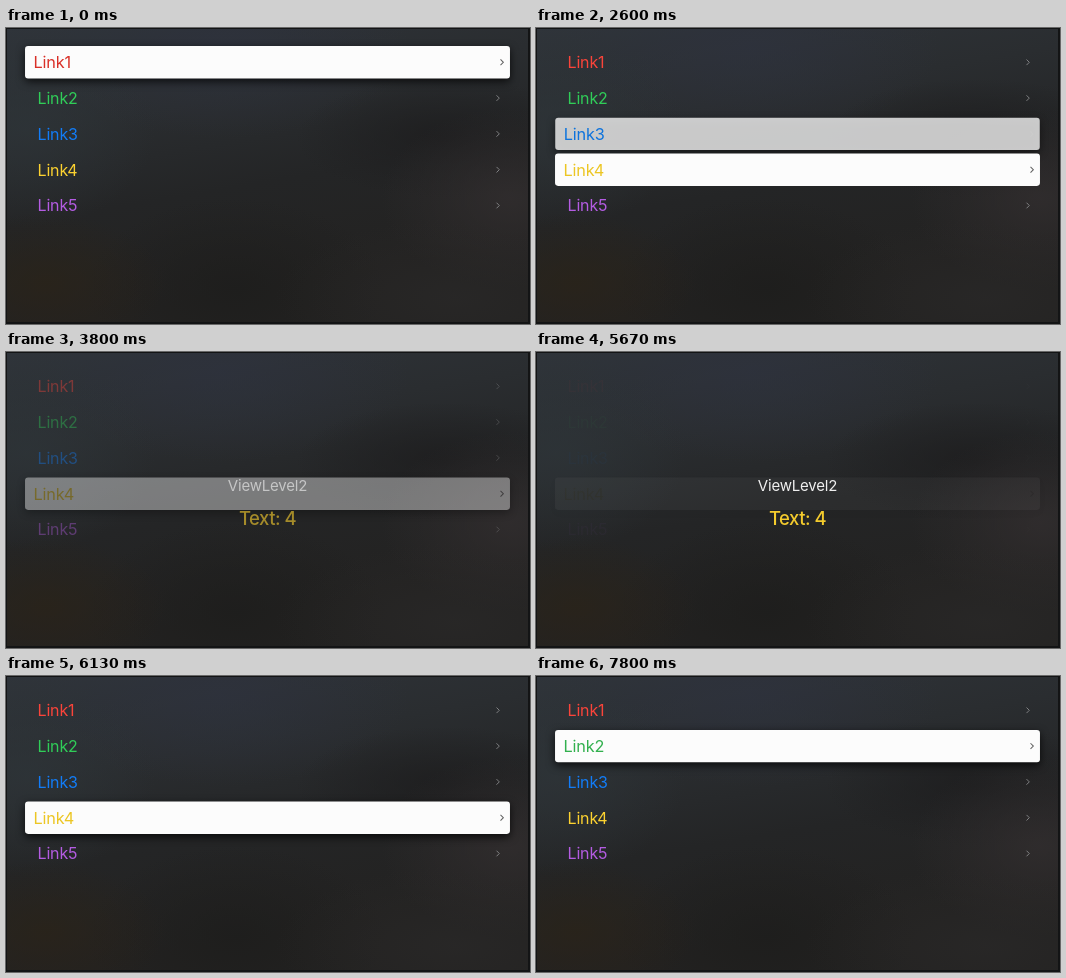
Write an HTML page with a canvas that moves like this. It is 524 by 296 pixels and loops after 8 s.

```html
<!DOCTYPE html>
<html lang="en">
<head>
<meta charset="utf-8">
<title>Link list</title>
<style>
  html, body { margin: 0; width: 100%; height: 100%; overflow: hidden; background: #262728; }
  canvas { display: block; }
</style>
</head>
<body>
<canvas id="stage" width="524" height="296"></canvas>
<script>
const W = 524, H = 296, LOOP = 8000;
const GROW = 1.0175, FADE = 200;
const MID = 261.5;
const FONT = 'Inter, Roboto, sans-serif';

const links = [
  { rest: [250, 68, 58], lit: [217, 48, 40] },
  { rest: [48, 205, 88], lit: [50, 176, 78] },
  { rest: [18, 124, 246], lit: [12, 112, 214] },
  { rest: [252, 210, 48], lit: [236, 198, 36] },
  { rest: [180, 92, 226], lit: [160, 76, 205] },
];

// Focus moves: time and row
const moves = [[0, 0], [1200, 1], [1930, 2], [2600, 3], [7000, 2], [7600, 1]];

const stage = document.getElementById('stage').getContext('2d');
const backdrop = makeLayer();
const list = makeLayer();

function makeLayer() {
  const c = document.createElement('canvas');
  c.width = W;
  c.height = H;
  return c.getContext('2d');
}

const clamp = v => Math.min(1, Math.max(0, v));
const ramp = (t, from, to) => clamp((t - from) / (to - from));
const mix = (a, b, k) => a + (b - a) * k;
const rgb = (a, b, k) => `rgb(${a.map((v, i) => Math.round(mix(v, b[i], k)))})`;

function glow(g, x, y, rx, ry, color, alpha) {
  g.save();
  g.translate(x, y);
  g.scale(rx, ry);
  const fill = g.createRadialGradient(0, 0, 0, 0, 0, 1);
  fill.addColorStop(0, `rgba(${color},${alpha})`);
  fill.addColorStop(0.5, `rgba(${color},${alpha * 0.5})`);
  fill.addColorStop(1, `rgba(${color},0)`);
  g.fillStyle = fill;
  g.fillRect(-1, -1, 2, 2);
  g.restore();
}

function paintBackdrop(g) {
  const base = g.createLinearGradient(0, 0, 50, H);
  base.addColorStop(0, '#2f343a');
  base.addColorStop(0.35, '#2a2d30');
  base.addColorStop(0.65, '#242526');
  base.addColorStop(1, '#232221');
  g.fillStyle = base;
  g.fillRect(0, 0, W, H);
  glow(g, 215, 20, 190, 90, '46,50,62', 0.7);
  glow(g, 20, 100, 130, 100, '46,53,57', 0.7);
  glow(g, 440, 110, 150, 60, '30,30,31', 0.9);
  glow(g, 505, 170, 130, 90, '50,46,47', 0.8);
  glow(g, 230, 260, 150, 90, '29,29,28', 0.8);
  glow(g, 40, 255, 120, 70, '42,35,25', 0.8);
  glow(g, 450, 270, 180, 80, '43,42,42', 0.6);
  g.strokeStyle = '#131415';
  g.lineWidth = 2;
  g.strokeRect(0, 0, W, H);
  g.fillStyle = '#131415';
  g.fillRect(W - 2, 0, 2, H);
  g.fillRect(0, H - 2, W, 2);
}

function write(g, text, x, y, size, weight, color, spacing) {
  g.font = `${weight} ${size}px ${FONT}`;
  g.letterSpacing = spacing + 'px';
  g.fillStyle = color;
  g.fillText(text, x, y);
}

function drawRow(g, i, focus, scale, shadow) {
  const link = links[i];
  g.save();
  g.translate(MID, 34.3 + i * 35.8);
  g.scale(scale, scale);
  if (focus > 0) {
    g.save();
    g.globalAlpha = focus;
    g.fillStyle = '#fcfcfc';
    g.shadowColor = `rgba(0,0,0,${0.75 * shadow})`;
    g.shadowBlur = 9;
    g.shadowOffsetY = 3;
    g.beginPath();
    g.roundRect(-238.3, -15.9, 476.6, 31.8, 3);
    g.fill();
    g.restore();
  }
  g.textAlign = 'left';
  write(g, 'Link' + (i + 1), -230, 5.8, 16, 400, rgb(link.rest, link.lit, focus), -0.15);
  g.strokeStyle = focus === 1 ? '#626262' : rgb([128, 129, 131], [225, 225, 225], focus);
  g.lineWidth = 1;
  g.beginPath();
  g.moveTo(229, -2.8);
  g.lineTo(231.8, 0);
  g.lineTo(229, 2.8);
  g.stroke();
  g.restore();
}

function drawList(g, t) {
  const n = moves.findLastIndex(m => t >= m[0]);
  const [since, now] = moves[n];
  const last = n > 0 ? moves[n - 1][1] : -1;
  const gone = ramp(t, since - 55, since + FADE);
  const press = Math.sin(Math.PI * ramp(t, 3230, 3470));

  g.clearRect(0, 0, W, H);
  links.forEach((_, i) => {
    if (i === now) return;
    const focus = i === last ? 1 - gone : 0;
    const scale = focus ? mix(GROW, 1, gone * gone) : 1;
    drawRow(g, i, focus, scale, focus);
  });
  const shadow = n > 0 ? ramp(t, since, since + FADE) : 1;
  drawRow(g, now, 1, mix(GROW, 1, press), shadow);
}

function drawDetail(g) {
  g.textAlign = 'center';
  write(g, 'ViewLevel2', MID, 138.5, 15, 400, '#f7f7f7', -0.2);
  write(g, 'Text: 4', MID, 173, 18.5, 500, '#fcd12e', -0.5);
}

function draw(t) {
  const detail = ramp(t, 3390, 4070) - ramp(t, 5655, 6130);
  stage.globalAlpha = 1;
  stage.drawImage(backdrop.canvas, 0, 0);
  if (detail < 1) {
    drawList(list, t);
    stage.globalAlpha = 1 - detail;
    stage.drawImage(list.canvas, 0, 0);
  }
  if (detail > 0) {
    stage.globalAlpha = detail;
    drawDetail(stage);
  }
}

paintBackdrop(backdrop);
const start = performance.now();
function tick() {
  draw((performance.now() - start) % LOOP);
  requestAnimationFrame(tick);
}
tick();
</script>
</body>
</html>
```
